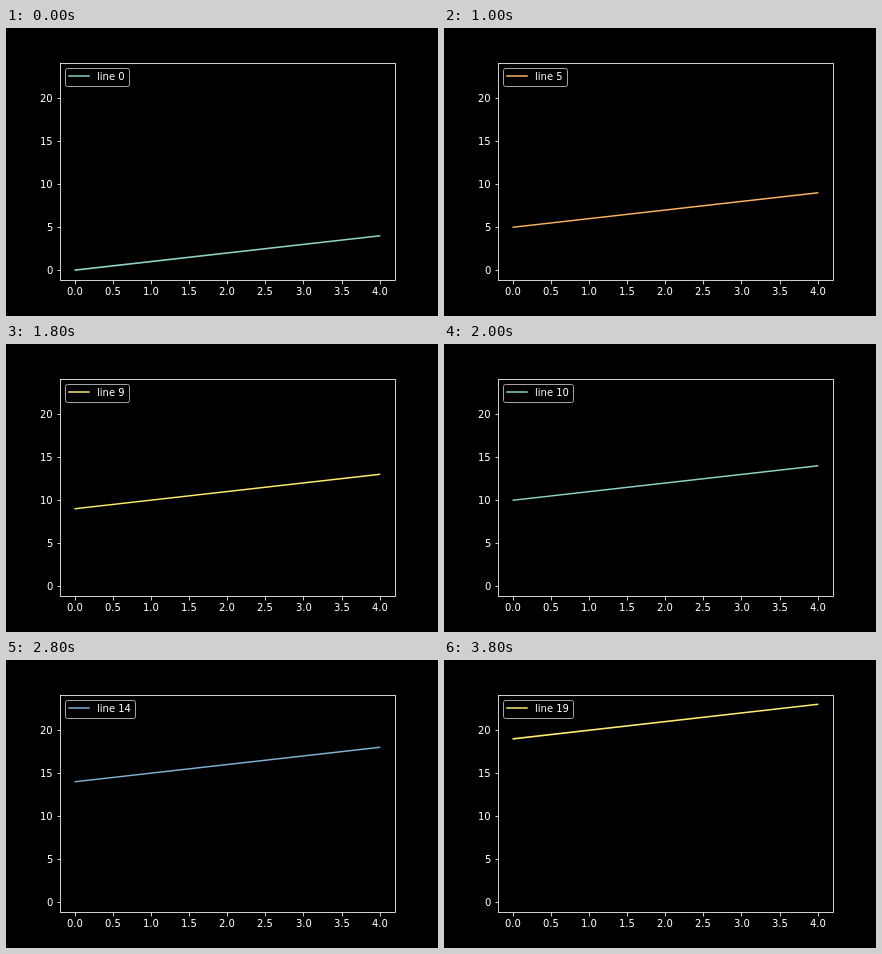
Write an HTML page that moves like this. It is 432 px wide and 288 px high and loops after 4 s.

```html
<!DOCTYPE html>
<html lang="en">
<head>
<meta charset="utf-8">
<title>Rising lines</title>
<style>
  html, body { margin: 0; width: 432px; height: 288px; overflow: hidden; background: #000; }
  svg { display: block; }
  text { font: 10px "DejaVu Sans", sans-serif; fill: #fff; }
  .axis { fill: none; stroke: #fff; stroke-width: 0.8; }
  .series { fill: none; stroke-width: 1.5; stroke-linecap: square; }
</style>
</head>
<body>
<svg width="432" height="288" viewBox="0 0 432 288">
  <rect width="432" height="288"/>
  <g id="axes"><rect class="axis" x="54.5" y="35.5" width="335" height="217"/></g>
  <path id="line" class="series"/>
  <rect id="frame" x="59.5" y="40.5" height="18" rx="2" stroke="#a3a3a3"/>
  <path id="key" class="series" d="M63 48H83"/>
  <text id="label" x="91" y="52"></text>
</svg>
<script>
const STEP = 200, COUNT = 20;
const COLORS = ["#8dd3c7", "#feffb3", "#bfbbd9", "#fa8174", "#81b1d2",
                "#fdb462", "#b3de69", "#bc82bd", "#ccebc4", "#ffed6f"];
const byId = id => document.getElementById(id);
const axes = byId("axes"), line = byId("line"), frame = byId("frame"),
      key = byId("key"), label = byId("label");

const xAt = v => 54 + (v + 0.2) / 4.4 * 334.8;
const yAt = v => 252 - (v + 1.15) / 25.3 * 217.44;

function add(name, attrs, text = "") {
  const node = document.createElementNS("http://www.w3.org/2000/svg", name);
  for (const k in attrs) node.setAttribute(k, attrs[k]);
  node.textContent = text;
  axes.append(node);
}

for (let v = 0; v <= 4; v += 0.5) {
  const x = xAt(v);
  add("path", { class: "axis", d: `M${Math.round(x) + 0.5} 252.5v4` });
  add("text", { x: Math.round(x - 7.95), y: 267 }, v.toFixed(1));
}
for (let v = 0; v <= 20; v += 5) {
  const y = yAt(v);
  add("path", { class: "axis", d: `M51.5 ${Math.round(y) + 0.5}h3` });
  add("text", { x: v < 10 ? 41 : 34, y: Math.round(y + 3.7) }, v);
}

let shown = -1;
function draw(time) {
  const n = Math.floor(time / STEP) % COUNT;
  if (n !== shown) {
    shown = n;
    const color = COLORS[n % COLORS.length];
    line.setAttribute("d", `M${xAt(0)} ${yAt(n)}L${xAt(4)} ${yAt(n + 4)}`);
    line.setAttribute("stroke", color);
    key.setAttribute("stroke", color);
    frame.setAttribute("width", n < 10 ? 64 : 70);
    label.textContent = `line ${n}`;
  }
}

const start = performance.now();
function tick() {
  draw(performance.now() - start);
  requestAnimationFrame(tick);
}
tick();
</script>
</body>
</html>
```
